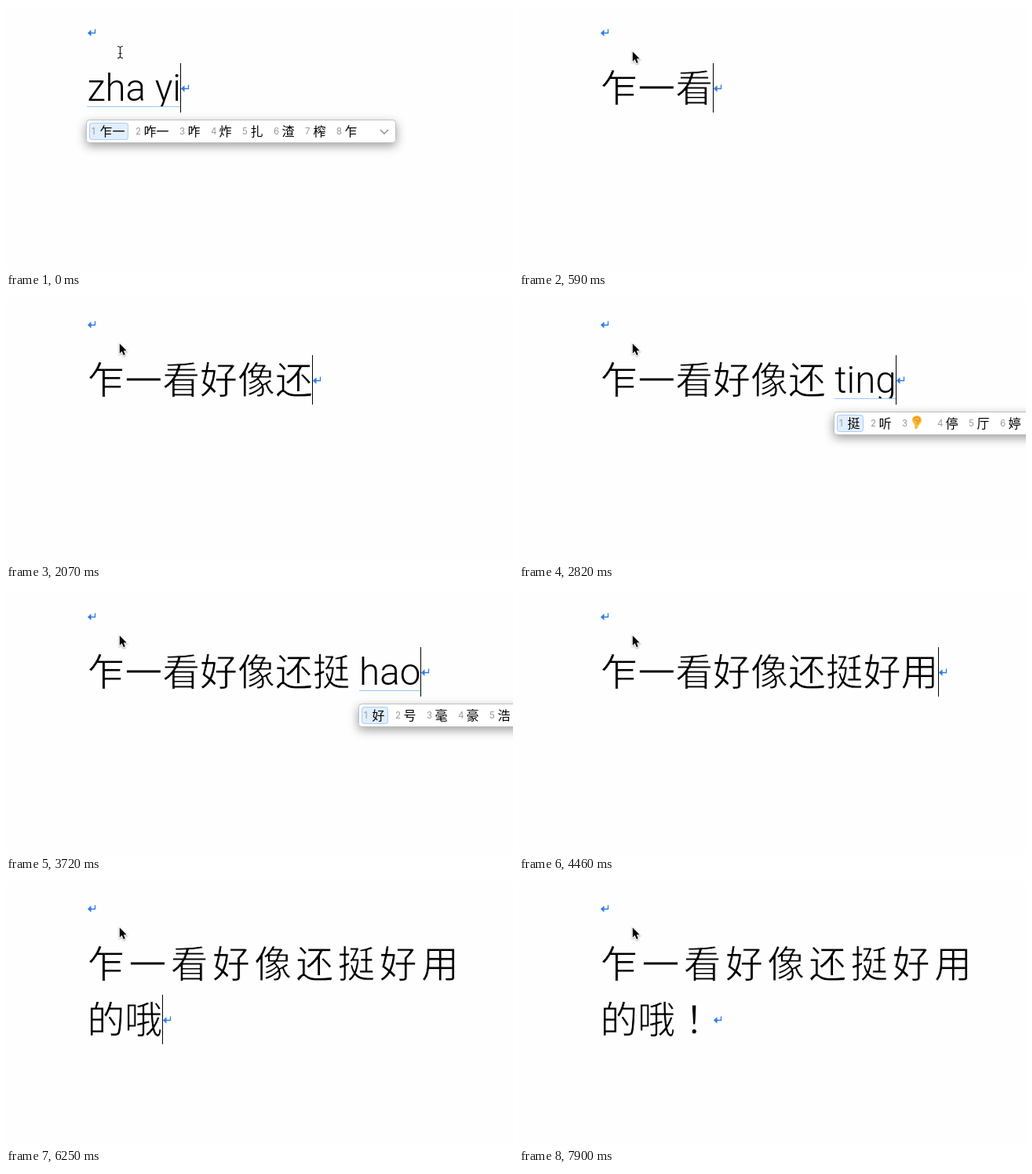
These frames come from a looping animation (646x337 px, 8 s). An HTML page with a canvas:

```html
<!DOCTYPE html>
<html lang="zh-CN">
<head>
<meta charset="utf-8">
<title>Pinyin typing</title>
<style>
  html, body { margin: 0; width: 100%; height: 100%; overflow: hidden; background: #fefefe; }
  canvas { display: block; }
</style>
</head>
<body>
<canvas width="646" height="337"></canvas>
<script>
const ctx = document.querySelector('canvas').getContext('2d');
const LOOP = 8000, PAPER = '#fefefe', BLUE = '#2b7de9';
const LEFT = 103.4, RIGHT = 576.8, EM = 47.9, LINE = 71, MIXED_GAP = 11.4;
const HAN = `300 ${EM}px "Noto Sans CJK SC", "Noto Sans CJK", sans-serif`;
const HAN_CENTERED = `300 ${EM}px "Noto Sans CJK JP", "Noto Sans CJK", sans-serif`;
const LATIN = '300 47.5px Roboto, sans-serif';
const SMALL = '16px "Noto Sans CJK SC", "Noto Sans CJK", sans-serif';
const DIGIT = '11.5px Inter, sans-serif';

// [start ms, committed text, pinyin, candidates, caret hidden]
const steps = [
  [0, '', 'zha yi', '乍一 咋一 咋 炸 扎 渣 榨 乍'],
  [150, '', 'zha yi k', '乍一看 咋一看 乍一 咋一 咋 炸 扎'],
  [300, '', 'zha yi ka', '乍一看 咋一看 乍一 咋一 咋 炸 扎'],
  [440, '', 'zha yi kan', '乍一看 咋一看 乍一 咋一 咋 炸 扎'],
  [590, '乍一看'],
  [740, '乍一看', 'ha', '哈 蛤 铪 哈哈 还 好 和'],
  [880, '乍一看', 'hao', '好 号 毫 豪 浩 耗 壕 👌'],
  [1030, '乍一看', 'hao x', '好想 好像 好笑 好戏 好像是 好'],
  [1180, '乍一看', 'hao xi', '好戏 好喜 好细 好洗 好像 好 👌'],
  [1330, '乍一看', 'hao xian', '好显 好闲 好险 好咸 好像 好 👌'],
  [1470, '乍一看', 'hao xiang', '好像 好想 好象 好香 好响 好 👌'],
  [1620, '乍一看好像'],
  [1770, '乍一看好像', 'ha', '哈 蛤 铪 哈哈 还 好 和'],
  [1920, '乍一看好像', 'hai', '还 海 害 孩 嗨 咳 骇 亥'],
  [2070, '乍一看好像还'],
  [2370, '乍一看好像还', 't', '他 她 它 天 太 听 同 提'],
  [2520, '乍一看好像还', 'ti', '提 题 体 替 踢 梯 剃 蹄'],
  [2670, '乍一看好像还', 'tin', '听 挺 停 厅 庭 婷 亭 艇'],
  [2820, '乍一看好像还', 'ting', '挺 听 👂 停 厅 婷 庭 亭'],
  [2970, '乍一看好像还挺'],
  [3120, '乍一看好像还挺', 'h', '好 和 后 会 很 还 或 话'],
  [3570, '乍一看好像还挺', 'ha', '哈 蛤 铪 哈哈 还 好 和'],
  [3720, '乍一看好像还挺', 'hao', '好 号 毫 豪 浩 耗 壕 👌'],
  [3870, '乍一看好像还挺', 'hao y', '好用 好友 好运 好 👌 号'],
  [4010, '乍一看好像还挺', 'hao yo', '好用 好友 好有 好 👌 号'],
  [4310, '乍一看好像还挺', 'hao yong', '好用 好勇 号用 好 👌 号'],
  [4460, '乍一看好像还挺好用'],
  [4900, '乍一看好像还挺好用', 'de', '的 得 地 德 嘚 锝 的话 底'],
  [5050, '乍一看好像还挺好用的'],
  [5650, '乍一看好像还挺好用的', '', '', true],
  [5950, '乍一看好像还挺好用的', 'o'],
  [6100, '乍一看好像还挺好用的', 'o', '哦 噢 喔 嚄 筽 呕'],
  [6250, '乍一看好像还挺好用的哦'],
  [6850, '乍一看好像还挺好用的哦', '', '', true],
  [7150, '乍一看好像还挺好用的哦！'],
  [7900, '乍一看好像还挺好用的哦！', '', '', true],
];

function write(text, x, y, font, color = '#000') {
  ctx.font = font;
  ctx.fillStyle = color;
  ctx.fillText(text, x, y);
}

// A paper-coloured outline trims the regular weight to a light one.
function writeLight(text, x, y, font) {
  write(text, x, y, font);
  ctx.strokeStyle = PAPER;
  ctx.lineWidth = .9;
  ctx.lineJoin = 'round';
  ctx.strokeText(text, x, y);
}

function stroke(path, color, width) {
  ctx.strokeStyle = color;
  ctx.lineWidth = width;
  ctx.lineJoin = 'miter';
  ctx.stroke(new Path2D(path));
}

function fill(path, color) {
  ctx.fillStyle = color;
  ctx.fill(new Path2D(path));
}

function at(x, y, draw) {
  ctx.save();
  ctx.translate(x, y);
  draw();
  ctx.restore();
}

// Breaks the tokens into lines and justifies every line but the last.
function layout(committed, pinyin) {
  ctx.font = LATIN;
  const space = ctx.measureText(' ').width;
  const tokens = [
    ...[...committed].map(text => ({ text, width: EM })),
    ...pinyin.split(' ').filter(Boolean)
      .map(text => ({ text, latin: true, width: ctx.measureText(text).width })),
  ];
  const lines = [[]];
  let x = LEFT;
  for (const token of tokens) {
    let line = lines.at(-1);
    const last = line.at(-1);
    if (last && token.latin) x += last.latin ? space : MIXED_GAP;
    if (x + token.width > RIGHT) {
      const extra = (RIGHT - last.x - last.width) / (line.length - 1);
      line.forEach((t, i) => t.x += i * extra);
      lines.push(line = []);
      x = LEFT;
    }
    token.x = x;
    token.row = lines.length - 1;
    line.push(token);
    x += token.width;
  }
  return { lines, end: x };
}

function drawLine(line, top) {
  const words = line.filter(t => t.latin);
  for (const t of line) {
    if (t.latin) write(t.text, t.x, top + 121, LATIN);
    else writeLight(t.text, t.x, top + 122, t.text === '！' ? HAN_CENTERED : HAN);
  }
  if (!words.length) return;
  const start = Math.floor(words[0].x), last = words.at(-1);
  const width = Math.floor(last.x + last.width) - start;
  ctx.fillStyle = PAPER;
  ctx.fillRect(start, top + 128, width, 8);
  ctx.fillStyle = '#9cc8f8';
  ctx.fillRect(start, top + 128, width, 1);
}

function drawReturn(x, y) {
  at(x, y, () => {
    stroke('M3 .5H9.5V-4.5', BLUE, 1.3);
    fill('M0 .5L4.5-3.8V4.8Z', BLUE);
  });
}

const emoji = {
  '👌'() {
    ctx.lineCap = 'round';
    stroke('M8 8L7 2M11 8L11 1.5M13.5 9L15 4', '#fbc23c', 2.6);
    fill('M7 8Q12 5 15 9Q15 15 11 18H6Q4 15 5 12Z', '#fbc23c');
    stroke('M7.5 9A3 3 0 1 0 7 14', '#f2a92e', 2.3);
  },
  '👂'() {
    fill('M2 7C1-1 14-1 14 6C14 11 10 12 9 16C8 19 4 18 5 14C5 11 3 10 2 7Z', '#fbbd3a');
    stroke('M4.5 6C5 1 12 2 11.5 6.5C11 9 8 9 8 12M6 7Q9 5 9 9', '#dc8b22', 1.2);
  },
};

function box(x, y, w, h, r, color) {
  ctx.beginPath();
  ctx.roundRect(x, y, w, h, r);
  ctx.fillStyle = color;
  ctx.fill();
}

function drawPopup(left, top, list) {
  const items = list.split(' ');
  const pill = text => 18 + (emoji[text] ? 21 : 16 * text.length);
  const natural = items.reduce((sum, text) => sum + pill(text) + 6, 2);
  const paged = natural > 245, width = paged ? 395 : natural;

  at(left, top + 146, () => {
    ctx.shadowColor = 'rgba(0,0,0,.4)';
    ctx.shadowBlur = 13;
    ctx.shadowOffsetY = 4;
    box(0, 0, width, 28.5, 4, '#fff');
    ctx.shadowColor = 'transparent';
    ctx.beginPath();
    ctx.roundRect(.5, -.5, width - 1, 29, 4);
    ctx.strokeStyle = '#c0c0c0';
    ctx.lineWidth = 1;
    ctx.stroke();

    let x = 4;
    items.forEach((text, i) => {
      const w = pill(text);
      if (paged && x + w > 364) return;
      if (i === 0) {
        box(x, 3, w, 22, 4, '#a9d0f7');
        box(x + 1, 4, w - 2, 20, 3, '#e1effd');
      }
      write(i + 1, x + 3, 18, DIGIT, '#999');
      if (emoji[text]) at(x + 14, 3.5, emoji[text]);
      else write(text, x + 13.5, 19.5, SMALL);
      x += w + 6;
    });
    if (paged) stroke('M375 12L380 17L385 12', '#8a8a8a', 1.3);
  });
}

function drawPointer(beam) {
  if (beam) {
    at(145.5, 51, () => {
      const path = 'M-3.5 .5Q0 .5 0 3V13Q0 15.5-3.5 15.5M3.5 .5Q0 .5 0 3V13Q0 15.5 3.5 15.5M-2 9.5H2';
      stroke(path, '#222', 1.2);
    });
    return;
  }
  at(144.8, 58.2, () => {
    const path = 'M0 0V12.6L2.9 9.9L5 14.8L7 13.9L5 9.1H8.9Z';
    ctx.shadowColor = 'rgba(0,0,0,.35)';
    ctx.shadowBlur = 2;
    ctx.shadowOffsetY = 1;
    stroke(path, '#fff', 2);
    ctx.shadowColor = 'transparent';
    fill(path, '#000');
  });
}

function draw(time) {
  const [, committed, pinyin = '', candidates, caretHidden] = steps.findLast(s => s[0] <= time);
  const { lines, end } = layout(committed, pinyin);
  const caretX = Math.floor(end), caretTop = (lines.length - 1) * LINE;

  ctx.fillStyle = PAPER;
  ctx.fillRect(0, 0, 646, 337);
  drawReturn(104, 34);
  lines.forEach((line, row) => drawLine(line, row * LINE));
  drawReturn(caretX + 1, caretTop + 105);
  if (!caretHidden) {
    ctx.fillStyle = '#000';
    ctx.fillRect(caretX, caretTop + 73, 1, 63);
  }
  if (candidates) {
    const first = lines.flat().find(t => t.latin);
    drawPopup(Math.floor(first.x) - 1, first.row * LINE, candidates);
  }
  drawPointer(time < 590);
}

const begin = performance.now();
function tick() {
  draw((performance.now() - begin) % LOOP);
  requestAnimationFrame(tick);
}
tick();
</script>
</body>
</html>
```
